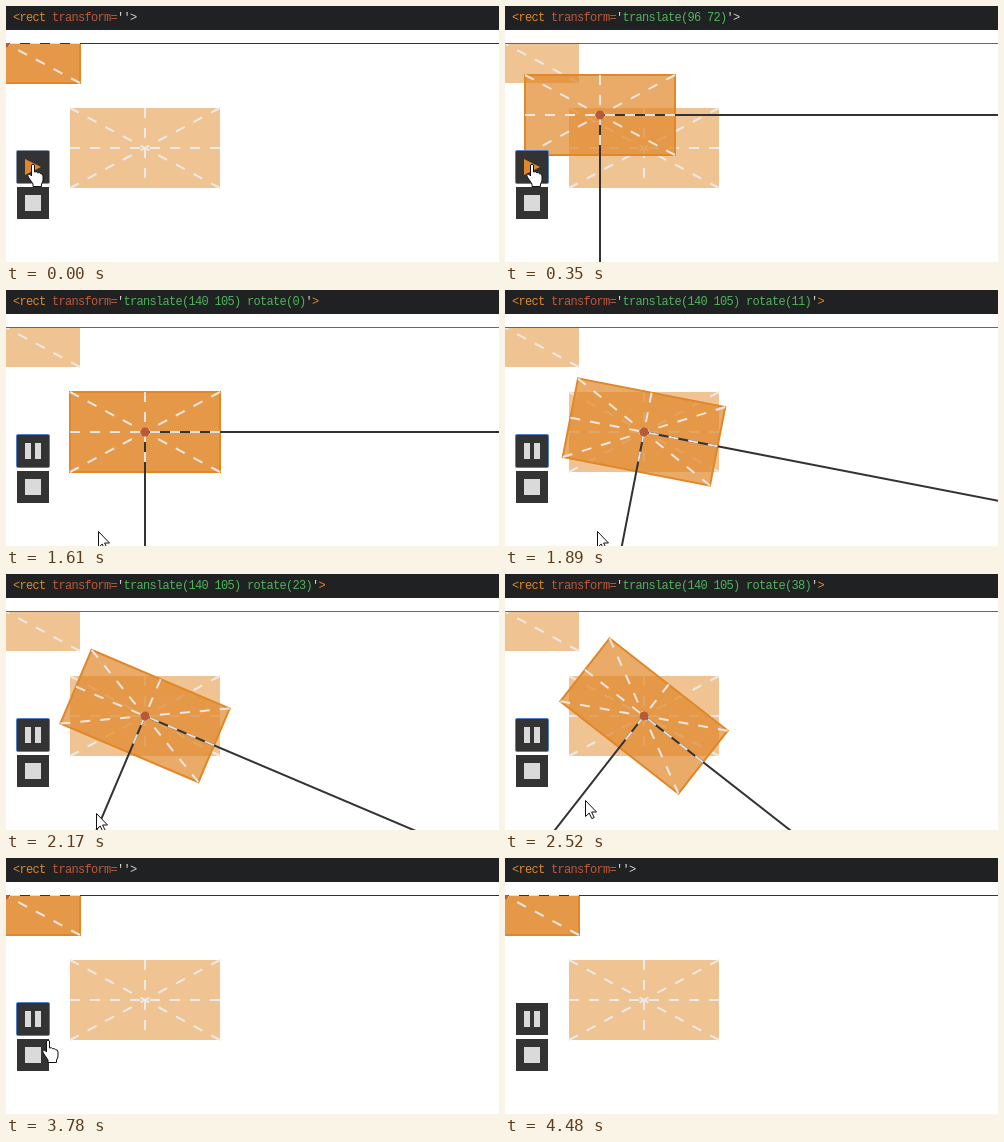
Animation of 493x256 px, one loop 4550 ms. Source, as an HTML page:

```html
<!DOCTYPE html>
<html lang="en">
<head>
<meta charset="utf-8">
<title>SVG transform steps</title>
<style>
  html, body { margin: 0; width: 100%; height: 100%; overflow: hidden; background: #fff; }
  svg { display: block; position: absolute; left: 0; top: 0; }
  #code { font: 12px "Liberation Mono", monospace; letter-spacing: -.7px; white-space: pre; fill: #d8d4cc; }
  .tag { fill: #e18728; }
  .attr { fill: #c0583a; }
  .value { fill: #4fb35c; }
  .ghost { fill: #f0c393; }
  .fill { fill: #e18728; fill-opacity: .7; stroke: #e18728; stroke-width: 2; }
  .dash { fill: none; stroke: #eaeaea; stroke-width: 2; stroke-dasharray: 10; }
  .axes { fill: none; stroke: #333; stroke-width: 2; }
  .light { fill: #dadada; }
  .cursor { fill: #fff; stroke: #111; stroke-linejoin: round; }
</style>
</head>
<body>
<svg width="493" height="256" viewBox="0 0 493 256">
  <defs>
    <clipPath id="stage"><rect y="37" width="493" height="219"/></clipPath>
    <path id="cross" class="dash" d="M-75-40 75 40M-75 40 75-40M-75 0H75M0-40V40"/>
    <g id="ghost"><rect class="ghost" x="-75" y="-40" width="150" height="80"/><use href="#cross"/></g>
  </defs>

  <rect width="493" height="24" fill="#1f2122"/>
  <text id="code" x="7" y="15"><tspan class="tag">&lt;rect </tspan><tspan class="attr">transform=</tspan>'<tspan class="value" id="value"></tspan>'<tspan id="close">&gt;</tspan></text>

  <g clip-path="url(#stage)">
    <use href="#ghost" x="-1" y="37"/>
    <use href="#ghost" x="139" y="142"/>
    <rect y="37" width="493" height="1" fill="#686868"/>
    <g id="box">
      <rect class="fill" x="-75" y="-40" width="150" height="80"/>
      <path class="axes" d="M700 0H0V700"/>
      <use href="#cross" opacity=".95"/>
      <circle r="4.6" fill="#b85a36"/>
    </g>
  </g>

  <rect x="11" y="145" width="32" height="32" fill="#333"/>
  <rect id="ring" x="10.5" y="144.5" width="33" height="33" rx="1" fill="none"/>
  <path id="play" d="M19 153 35 161 19 169Z" fill="#e18728"/>
  <path id="pause" class="light" d="M19 153h6v16h-6zM29 153h6v16h-6z"/>
  <rect x="11" y="181" width="32" height="32" fill="#333"/>
  <rect class="light" x="19" y="189" width="16" height="16"/>

  <path id="hand" class="cursor" d="M-1.5 1Q0-.6 1.5 1V8Q4 7 4.6 8.8 7 8 7.6 9.8 10 9.4 10 12V16Q10 18 8.5 20V22.5H0V20L-4.7 13Q-6 10.5-4.5 10-3 9.7-1.5 12Z"/>
  <path id="arrow" class="cursor" d="M.5.5V16.5L4.2 13 6.8 18.6 9.2 17.5 6.6 12H11.5Z"/>
</svg>
<script>
  const LOOP = 4550, STEP = 70;
  const $ = id => document.getElementById(id);
  const show = (id, on) => $(id).setAttribute('visibility', on ? 'visible' : 'hidden');
  const clamp = (v, max) => Math.max(0, Math.min(max, v));

  // Pointer path: time, x, y
  const path = [
    [0, 27, 158], [350, 27, 158], [770, 92, 241], [2100, 92, 241],
    [2520, 80, 226], [2800, 45, 201], [3150, 45, 201],
    [3220, 44, 200], [3570, 42, 182], [LOOP, 42, 182]
  ];

  function pointer(t) {
    const i = path.findIndex(p => p[0] > t);
    const [t0, x0, y0] = path[i - 1], [t1, x1, y1] = path[i];
    const k = (t - t0) / (t1 - t0);
    return [x0 + (x1 - x0) * k, y0 + (y1 - y0) * k].map(Math.round);
  }

  function draw(t) {
    const moved = t >= 350 && t < 3780;
    const x = moved ? clamp(96 + (t - 350) * 140 / 1050, 140) : 0;
    const y = x * .75;
    const angle = moved ? clamp(11 + (t - 1890) * 45 / 1050, 45) : 0;
    let value = moved ? `translate(${Math.round(x)} ${Math.round(y)})` : '';
    if (moved && t >= 1610) value += ` rotate(${Math.round(angle)})`;
    $('value').textContent = value;
    $('close').setAttribute('class', moved && t >= 420 ? 'tag' : '');
    $('box').setAttribute('transform', `translate(${x - 1} ${y + 37}) rotate(${angle})`);

    show('play', t < 420);
    show('pause', t >= 420);
    show('ring', t < 4480);
    $('ring').setAttribute('stroke', t < 70 ? '#8794a8' : '#4f7fcb');

    const [px, py] = pointer(t);
    const hand = t < 420 || t >= 3430;
    const visible = t < 3850;
    show('hand', visible && hand);
    show('arrow', visible && !hand);
    for (const id of ['hand', 'arrow']) $(id).setAttribute('transform', `translate(${px} ${py})`);
  }

  const start = performance.now();
  function tick() {
    const t = (performance.now() - start) % LOOP;
    draw(Math.floor(t / STEP) * STEP);
    requestAnimationFrame(tick);
  }
  tick();
</script>
</body>
</html>
```
